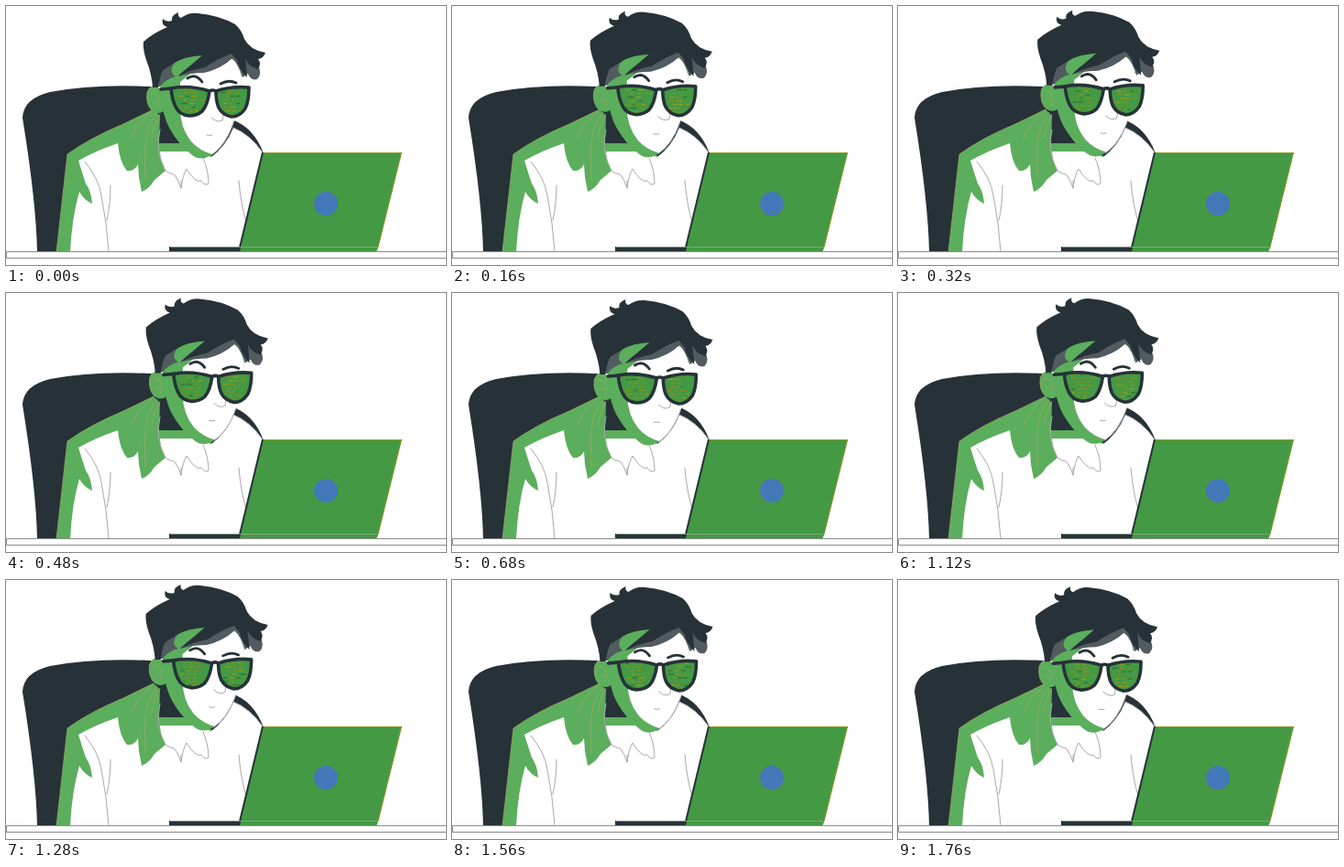
These frames come from a looping animation (480 px wide and 283 px high, 1.8 s). An HTML page:

```html
<!DOCTYPE html>
<html lang="en">
<head>
<meta charset="utf-8">
<title>Working at a laptop</title>
<style>
html, body { margin: 0; width: 100%; height: 100%; overflow: hidden; background: #fff; }
svg { display: block; }
.dark { fill: #263238; }
.skin { fill: #5bae5c; }
.green { fill: #449944; }
.grey { fill: #515b60; }
.white { fill: #fff; }
.line { fill: none; stroke: #a9a9a9; stroke-linecap: round; }
.tan { fill: none; stroke: #9aaa62; stroke-width: .8; }
.rim, .brow { fill: none; stroke: #263238; stroke-width: 3.6; stroke-linejoin: round; stroke-linecap: round; }
.brow { stroke-width: 2.8; }
</style>
</head>
<body>
<svg width="480" height="283" viewBox="0 0 480 283">
  <defs>
    <path id="left" d="M180 90Q200 86 222 93Q220 108 214 115Q208 120 200 120Q189 119 185 110Q181 102 180 90Z"/>
    <path id="right" d="M229 93Q247 87 265 89Q265 104 261 112Q255 121 246 121Q236 119 232 111Q229 104 229 93Z"/>
    <clipPath id="lenses"><use href="#left"/><use href="#right"/></clipPath>
  </defs>

  <!-- chair -->
  <path class="dark" d="M34 269Q33 215 18 122Q19 101 48 94Q95 85 158 88L246 124Q270 132 281 161L240 170H72L58 269Z"/>

  <!-- body -->
  <path class="skin" d="M55 269L67 162Q90 145 128 129L161 113L168 120L167 150L202 150L226 165L215 180L165 205L90 230L70 269Z"/>
  <path class="white" d="M70 269Q72 230 80 203Q85 212 94 216Q93 202 87 194Q83 182 79 169Q96 159 122 150Q124 171 132 180Q140 181 144 173L145 187L148 203Q156 200 162 190L174 180Q168 168 168 159H204L224 165Q240 153 248 133Q266 140 280 160L256 264V269Z"/>
  <path class="tan" d="M55 269L67 162Q90 145 128 129L161 113M160 115Q142 128 137 145M165 116Q153 132 152 150T152 190M168 118Q161 130 159 145"/>
  <path class="line" d="M86 170Q101 188 104 207Q110 237 112 268M114 196Q114 217 110 234M168 135Q162 158 174 180L179 183Q185 181 191 199Q193 184 197 178Q207 194 213 191Q217 197 221 194Q221 180 215 166M191 199V191M254 191Q256 216 262 236M248 133Q266 140 280 160"/>

  <g id="head">
    <path class="skin" d="M169 91Q159 83 154 94Q152 108 160 115Q166 119 172 115Z"/>
    <path class="tan" d="M169 91Q159 83 154 94Q152 108 160 115M158 95Q166 94 168 106M160 105Q166 102 166 111"/>
    <path class="skin" d="M167 66L190 50L246 50L257 76Q256 106 247 130Q237 154 222 164Q211 170 202 162Q188 151 178 133Q171 120 169 98Z"/>
    <path class="white" d="M190 83Q203 73 212 64L235 50L252 62L257 78Q256 107 247 131Q238 153 225 162Q211 158 202 148Q190 133 190 112Z"/>
    <path class="line" d="M248 128Q240 153 224 163"/>
    <path class="grey" d="M166 88L168 67Q174 57 190 54L182 65Q178 73 185 77Q174 80 168 88Z"/>
    <path class="grey" d="M188 77Q200 60 247 48L275 65Q280 74 274 80Q267 82 264 74L258 78Q254 65 247 57Q234 69 216 73Q202 73 188 77Z"/>
    <path class="dark" d="M160 89Q159 74 153 59Q149 47 150 39Q160 30 176 23Q169 21 171 14Q175 18 181 16Q180 10 188 7Q187 12 191 13Q199 7 209 8Q232 10 250 20Q257 26 260 36Q266 48 283 51Q281 57 275 58Q279 62 275 69Q264 66 261 57L263 78Q255 71 252 59L246 52Q232 57 217 67Q204 69 187 77Q199 67 214 54Q195 55 184 62L171 70Q168 76 166 89Z"/>
    <path class="brow" d="M198 79Q207 73 214 83M234 85Q243 80 251 84"/>
    <path class="line" d="M234 106Q239 118 236 125Q230 128 224 122M219 141Q222 142 225 141"/>
    <use class="green" href="#left"/><use class="green" href="#right"/>
    <g clip-path="url(#lenses)"><g id="code"></g></g>
    <use class="rim" href="#left"/><use class="rim" href="#right"/>
    <path class="rim" d="M169 91L181 90M222 93Q225 91 229 93"/>
  </g>

  <!-- laptop and desk -->
  <path class="green" d="M280 160H432L406 264L404 269H254Z"/>
  <path fill="none" stroke="#8c9a20" d="M281 160.5H431L406 263"/>
  <path fill="none" stroke="#263238" stroke-width="2" d="M280 160L254 268"/>
  <path class="dark" d="M178 263H256L254 269H178Z"/>
  <path fill="none" stroke="#8fb58f" stroke-width=".7" d="M179 263.5H405"/>
  <circle cx="349" cy="216" r="13" fill="#4378b8"/>
  <path fill="#fff" stroke="#8c8c8c" d="M.5 268.5H481V275.5H.5Z"/>
</svg>
<script>
const LOOP = 1800, STEP = 40, ROWS = 16, PITCH = 4;
const head = document.getElementById("head");
const code = document.getElementById("code");
const colors = ["#a49a10", "#7f9218", "#8f9610", "#b08018", "#32702e"];

let seed = 11;
const random = () => (seed = seed * 16807 % 2147483647) / 2147483647;

function addDash(x, y, width, color) {
  const dash = document.createElementNS("http://www.w3.org/2000/svg", "rect");
  const attrs = { x, y, width, height: 1.2, fill: color };
  for (const key in attrs) dash.setAttribute(key, attrs[key]);
  code.append(dash);
}

// Lines of code, repeated once below so the scroll wraps cleanly
for (const left of [188, 234]) {
  for (let row = 0; row < ROWS; row++) {
    let x = left + Math.floor(random() * 3) * 3;
    const end = left + 14 + random() * 12;
    while (x < end) {
      const width = 1.5 + random() * 5;
      const color = colors[Math.floor(random() * colors.length)];
      for (const copy of [0, ROWS]) addDash(x, 86 + (row + copy) * PITCH, width, color);
      x += width + 1.5 + random() * 3;
    }
  }
}

// The head sways twice per loop; its rise runs ahead of the sideways drift
function draw(now) {
  const t = Math.floor(now % LOOP / STEP) * STEP / LOOP;
  const angle = t * 4 * Math.PI;
  const dx = 1.4 * (1 - Math.cos(angle));
  const dy = -0.9 * (1 - Math.cos(angle) + Math.sin(angle));
  head.setAttribute("transform", `translate(${dx} ${dy})`);
  code.setAttribute("transform", `translate(0 ${-t * ROWS * PITCH})`);
  requestAnimationFrame(draw);
}
draw(0);
</script>
</body>
</html>
```
